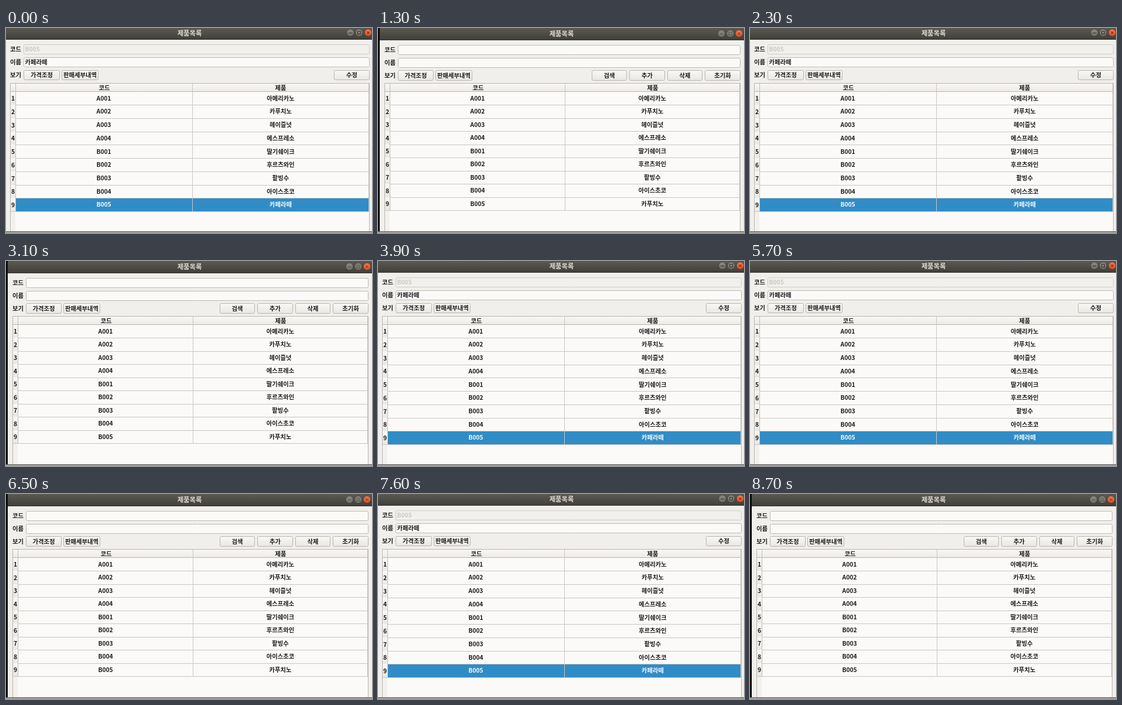
These frames come from a looping animation (625 by 350 pixels, 9500 ms). An HTML page with a canvas:

```html
<!DOCTYPE html>
<html lang="ko">
<head>
<meta charset="utf-8">
<title>제품목록</title>
<style>
html, body { margin: 0; width: 100%; height: 100%; overflow: hidden; background: #f1efeb; }
canvas { display: block; width: 625px; height: 350px; }
</style>
</head>
<body>
<canvas id="stage" width="625" height="350"></canvas>
<script>
const ctx = document.getElementById('stage').getContext('2d');
const LOOP = 9500;
const SWITCHES = [1300, 2300, 3100, 3900, 4600, 5700, 6500, 7600, 8700];
const FONT = '"Noto Sans CJK KR", "Noto Sans CJK", "Noto Sans CJK JP", sans-serif';
const INK = '#1c1b1a';
const PAPER = '#fbfaf9';
const WINDOW = '#f1efeb';

const CODES = ['A001', 'A002', 'A003', 'A004', 'B001', 'B002', 'B003', 'B004', 'B005'];
const NAMES = ['아메리카노', '카푸치노', '헤이즐넛', '에스프레소', '딸기쉐이크',
  '후르츠와인', '팥빙수', '아이스초코'];

const editView = {
  left: 7, right: 621, edge: 0, barH: 20, titleY: 8.5, controls: [588, 603, 618.5], controlY: 8,
  active: true, labelY: [36.5, 58.5, 80.5], fieldX: 30, fields: [[28, 17], [50, 17]],
  code: 'B005', name: '카페라떼', buttonY: 72, buttonH: 17,
  buttons: [[30, 62, '가격조정'], [95, 63, '판매세부내역'], [560, 61, '수정']],
  headW: 9, split: 318, pitch: 22.72, codeX: 167, nameX: 469, last: '카페라떼', selected: 8
};

const listView = {
  left: 11, right: 619, edge: 3, barH: 21, titleY: 10, controls: [586.5, 601.5, 616.5], controlY: 9.5,
  active: false, labelY: [37.5, 59.5, 81.5], fieldX: 34, fields: [[29, 17], [51, 17]],
  code: '', name: '', buttonY: 72, buttonH: 18,
  buttons: [[34, 61, '가격조정'], [98, 63, '판매세부내역'], [365, 60, '검색'],
    [429, 61, '추가'], [494, 60, '삭제'], [558, 61, '초기화']],
  headW: 9, split: 319, pitch: 22.5, codeX: 170, nameX: 468.5, last: '카푸치노', selected: -1
};

function rect(x, y, w, h, fill) {
  ctx.fillStyle = fill;
  ctx.fillRect(x, y, w, h);
}

function text(str, x, y, align = 'center', color = INK, size = 10.3) {
  ctx.font = `700 ${size}px ${FONT}`;
  ctx.textAlign = align;
  ctx.textBaseline = 'alphabetic';
  ctx.fillStyle = color;
  ctx.fillText(str, x, y + size * 0.36);
}

function shade(y, h, top, bottom) {
  const g = ctx.createLinearGradient(0, y, 0, y + h);
  g.addColorStop(0, top);
  g.addColorStop(1, bottom);
  return g;
}

function box(x, y, w, h, fill, line) {
  ctx.beginPath();
  ctx.roundRect(x + 0.5, y + 0.5, w - 1, h - 1, 2);
  ctx.fillStyle = fill;
  ctx.fill();
  ctx.strokeStyle = line;
  ctx.lineWidth = 1;
  ctx.stroke();
}

function control(x, y, kind, active) {
  const close = kind === 2;
  ctx.beginPath();
  ctx.arc(x, y, 6.2, 0, Math.PI * 2);
  ctx.fillStyle = close ? shade(y - 6, 12, '#f37a50', '#dd4b1d') : shade(y - 6, 12, '#8b8982', '#6f6d66');
  ctx.fill();
  ctx.strokeStyle = '#3f3d38';
  ctx.lineWidth = 0.7;
  ctx.stroke();
  ctx.strokeStyle = close ? (active ? '#43200f' : '#6b2c14') : (active ? '#34322e' : '#57554f');
  ctx.lineWidth = 1;
  ctx.beginPath();
  if (kind === 0) {
    ctx.moveTo(x - 3, y + 0.5);
    ctx.lineTo(x + 3, y + 0.5);
  } else if (kind === 1) {
    ctx.rect(x - 2.5, y - 2.5, 5, 5);
  } else {
    ctx.moveTo(x - 2, y - 2);
    ctx.lineTo(x + 2, y + 2);
    ctx.moveTo(x + 2, y - 2);
    ctx.lineTo(x - 2, y + 2);
  }
  ctx.stroke();
}

function drawTitle(v) {
  rect(0, 0, 625, v.barH, shade(0, v.barH, '#5b5952', '#403e39'));
  rect(0, v.barH - 1, 625, 1, '#36342f');
  text('제품목록', 313.5, v.titleY, 'center', '#dfdbd2', 11.3);
  v.controls.forEach((x, i) => control(x, v.controlY, i, v.active));
}

function drawForm(v) {
  ['코드', '이름', '보기'].forEach((s, i) => text(s, v.left, v.labelY[i], 'left'));
  v.fields.forEach(([y, h], i) => {
    const disabled = v.active && i === 0;
    box(v.fieldX, y, v.right - v.fieldX, h, disabled ? '#f2f0ec' : PAPER, disabled ? '#cfccc7' : '#bebbb6');
  });
  text(v.code, v.fieldX + 2.5, v.labelY[0], 'left', '#cbc9c5');
  text(v.name, v.fieldX + 2.5, v.labelY[1], 'left');
  for (const [x, w, label] of v.buttons) {
    box(x, v.buttonY, w, v.buttonH, shade(v.buttonY, v.buttonH, '#faf9f7', '#e9e6e2'), '#b9b5af');
    text(label, x + w / 2, v.labelY[2]);
  }
}

function drawTable(v) {
  const { left, right, split, pitch } = v;
  const top = 94, first = 108, bottom = 347, width = right - left;
  const body = left + v.headW;
  const rowY = i => Math.round(first + 0.6 + i * pitch);

  rect(left, top, width, bottom - top, PAPER);
  rect(left, top, width, first - top, shade(top, first - top, '#f9f8f6', '#eeebe7'));
  rect(left, first, v.headW, bottom - first, '#f3f1ee');

  CODES.forEach((code, i) => {
    const y = rowY(i), next = rowY(i + 1);
    const on = i === v.selected;
    const mid = first + 12 + i * pitch;
    rect(left, y, v.headW, next - y, shade(y, next - y, '#f9f8f6', '#eae7e3'));
    if (on) rect(body, y + 1, right - body - 1, next - y - 1, '#308cc6');
    rect(left, next, width, 1, '#c9c6c1');
    const color = on ? '#f4f8fb' : INK;
    text(i + 1, left + 5, mid + 0.5);
    text(code, v.codeX, mid, 'center', color);
    text(NAMES[i] || v.last, v.nameX, mid, 'center', color);
  });

  const end = rowY(CODES.length);
  rect(left, first, width, 1, '#bab7b1');
  rect(body, top, 1, end - top, '#c2bfb9');
  rect(split, top, 1, end - top, '#c9c6c1');
  rect(right - 2, top, 1, end - top, '#c9c6c1');
  text('코드', v.codeX + 1, 102);
  text('제품', 469, 102);

  rect(left, top, width, 1, '#b9b6b0');
  rect(left, top, 1, bottom - top, '#b9b6b0');
  rect(right - 1, top, 1, bottom - top, '#b9b6b0');
}

function draw(v) {
  rect(0, 0, 625, 350, WINDOW);
  drawTitle(v);
  drawForm(v);
  drawTable(v);
  rect(0, 0, v.edge, 347, '#0b0a0a');
  rect(0, 347, 625, 1, '#5c5a57');
  rect(0, 348, 625, 2, '#a5a29e');
}

const start = performance.now();
function tick() {
  const t = (performance.now() - start) % LOOP;
  const passed = SWITCHES.filter(s => t >= s).length;
  draw(passed % 2 ? listView : editView);
  requestAnimationFrame(tick);
}
tick();
</script>
</body>
</html>
```
